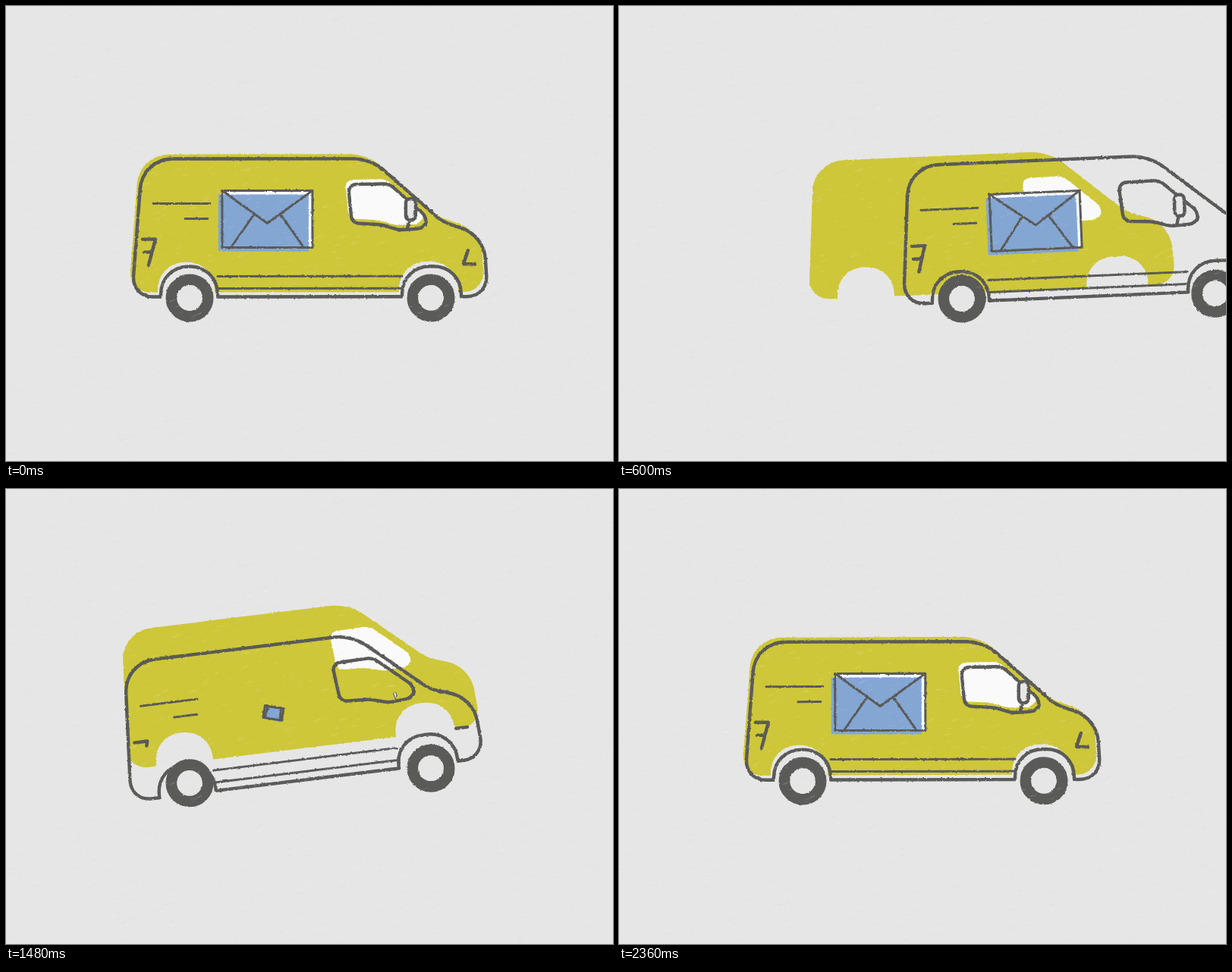
Animation of 800 by 600 pixels, one loop 2400 ms. Source, as an HTML page with a canvas:

```html
<!DOCTYPE html>
<html lang="en">
<head>
<meta charset="utf-8">
<title>Mail van</title>
<style>
  html, body { margin: 0; width: 100%; height: 100%; overflow: hidden; background: #e6e6e6; }
  svg, canvas { position: absolute; left: 0; top: 0; width: 800px; height: 600px; }
  .ink { fill: none; stroke: #5a5a58; stroke-width: 4.4; stroke-linejoin: round; stroke-linecap: round; }
  .thin { stroke-width: 3; }
  .paper { fill: #e6e6e6; }
  .white { fill: #fafafa; }
  #env * { vector-effect: non-scaling-stroke; }
</style>
</head>
<body>
<svg viewBox="0 0 800 600">
  <defs>
    <filter id="rough" filterUnits="userSpaceOnUse" x="0" y="0" width="800" height="600" color-interpolation-filters="sRGB">
      <feTurbulence type="fractalNoise" baseFrequency=".28" numOctaves="2" seed="4"/>
      <feDisplacementMap in="SourceGraphic" scale="2.6" xChannelSelector="R" yChannelSelector="G"/>
    </filter>
    <path id="glass"/>
  </defs>
  <g filter="url(#rough)">
    <g id="paint">
      <path id="bodyFill" fill="#cec739"/>
      <use id="glassFill" href="#glass" class="white"/>
    </g>
    <g id="line">
      <path id="bodyLine" class="ink"/>
      <path id="stripes" class="ink thin"/>
      <use id="glassLine" href="#glass" class="ink"/>
      <path id="speed" class="ink thin"/>
      <g id="rear">
        <path id="handle" class="ink" pathLength="1" d="M180 307H197L188 341"/>
        <path id="bar" class="ink" pathLength="1" d="M192 324H182"/>
      </g>
      <path id="lamp" class="ink" pathLength="1" d="M618 340H603L609 322"/>
      <g id="env">
        <rect class="white" x="-59.5" y="-37.5" width="119" height="75"/>
        <rect id="blue" fill="#84a6d3" x="-59.5" y="-37.5" width="119" height="75"/>
        <rect class="ink thin" x="-59.5" y="-37.5" width="119" height="75"/>
        <path id="flap" class="ink thin"/>
      </g>
      <g id="mirror">
        <path class="ink" d="M3 -11L0 0"/>
        <rect class="ink" style="fill:#e6e6e6" x="-2" y="-39" width="13" height="28" rx="5.5"/>
      </g>
    </g>
    <g id="wheels">
      <circle class="ink" style="fill:#e6e6e6"/>
      <circle class="ink" style="fill:#e6e6e6"/>
    </g>
  </g>
</svg>
<canvas width="800" height="600"></canvas>
<script>
const LOOP = 2400, STEP = 40, LAG = 40;
const LAUNCH = 400, GONE = 720, BORN = 800, APEX = 1240, LAND = 1480;
const { min, max, sin, cos, exp, PI, hypot } = Math;

const el = id => document.getElementById(id);
const lerp = (a, b, t) => a + (b - a) * t;
const ramp = (t, from, to) => min(1, max(0, (t - from) / (to - from)));
const smooth = (t, from, to) => { const u = ramp(t, from, to); return u * u * (3 - 2 * u); };
const out = (u, power) => 1 - (1 - u) ** power;
const pop = (t, from, to) => {
  const u = ramp(t, from, to) - 1;
  return u === -1 ? 0 : 1 + 2.7 * u ** 3 + 1.7 * u * u;
};

const set = (node, attrs) => { for (const k in attrs) node.setAttribute(k, attrs[k]); };
const show = (node, on) => { node.style.display = on ? '' : 'none'; };

// Closed path through [x, y, corner length] points.
function rounded(pts) {
  const n = pts.length;
  const toward = (p, q, r) => {
    const len = hypot(q[0] - p[0], q[1] - p[1]) || 1, k = min(1, r / len);
    return [lerp(p[0], q[0], k), lerp(p[1], q[1], k)];
  };
  return pts.map((p, i) => {
    const a = toward(p, pts[(i + n - 1) % n], p[2]), b = toward(p, pts[(i + 1) % n], p[2]);
    const bend = q => [lerp(q[0], p[0], .58), lerp(q[1], p[1], .58)];
    return `${i ? 'L' : 'M'}${a}C${bend(a)} ${bend(b)} ${b}`;
  }).join('') + 'Z';
}

// Leaving: lean back, then shoot off with cubic speed.
function leaving(t) {
  const pull = smooth(t, 60, 370), go = max(0, t - LAUNCH);
  return {
    dx: -38 * pull + 3.1e-5 * go ** 3,
    squash: max(-.12, .1 * pull - .0009 * go),
    rot: 1.6 * pull - 4 * ramp(t, 440, 540),
    wheelie: 1 + .17 * (smooth(t, 180, 400) - ramp(t, 440, 540))
  };
}

// Arriving: grow while leaping, fall, then swing to rest.
function arriving(t) {
  const after = max(0, t - LAND);
  const leap = t < APEX ? out(ramp(t, BORN, APEX), 2) : 1 - ramp(t, APEX + 20, LAND) ** 2.5;
  return {
    grow: out(ramp(t, BORN, 1120), 1.3),
    arch: -.5 + 1.5 * ramp(t, 1080, 1200),
    lift: -90 * leap + 20 * sin(PI * after / 400) * exp(-after / 250),
    rot: -7 * smooth(t, 1020, 1220) * cos(PI * after / 390) * exp(-((after / 450) ** 2)),
    swing: -32 * sin(PI * (t - 1540) / 350) * (1 - smooth(t, 1720, 1960)) * ramp(t, 1400, LAND)
  };
}

function pose(t) {
  const here = t < GONE;
  const a = leaving(here ? t : 0), b = arriving(here ? LOOP : t);
  const rot = a.rot + b.rot;
  const shift = (x, give = 1) => x + a.dx - give * a.squash * max(0, x - 279);
  // A newborn body is a thin drop, pinched at the sill.
  const place = (x, y) => {
    const pinch = 1 - .9 * ramp(y, 356, 383), up = 383 - y;
    const sx = 402 + (x - 400) * .1 * pinch + up * .05;
    const sy = 371 - up * .515 + max(0, x - 400) * up * .0007;
    return [shift(lerp(sx, x, b.grow)), lerp(sy, y, b.grow)];
  };
  return { ...a, ...b, rot, shift, place,
    clock: here ? LOOP : t,
    transform: `translate(0 ${b.lift}) rotate(${rot} ${400 + a.dx} 408)` };
}

// The wheel cut-outs start as bitten corners and slide inwards to become arches.
function sills(arch) {
  const cut = 1 + min(0, arch), slide = max(0, arch);
  return { cut, slide, rear: 157 + 47 * cut + 75 * slide, front: 648 - 44 * cut - 82 * slide };
}

function body(p) {
  const { cut, slide, rear, front } = sills(p.arch);
  const foot = 383 - 41 * (cut - slide), top = 383 - 40 * cut;
  const back = 157 + 9 * slide, nose = 648 - 13 * slide;
  const rearIn = 157 + 47 * slide, frontIn = 648 - 48 * slide;
  const soft = lerp(.2, 1, p.grow);
  return rounded([
    [rearIn, foot, 0], [back, foot, 28 * slide], [back + 14, 201, 40],
    [487 - 6 * slide, 201, 23], [592 - 17 * slide, 284, 10], [645 - 15 * slide, 303, 30],
    [nose, foot, 28 * slide], [frontIn, foot, 0],
    [frontIn, top, 37 * slide], [front, top, 37 * cut], [front, 383, 0],
    [rear, 383, 0], [rear, top, 37 * cut], [rearIn, top, 37 * slide]
  ].map(([x, y, r]) => [...p.place(x, y), r * soft]));
}

const scaleGlass = p =>
  `translate(${p.dx - p.squash * 55} 0) translate(500 262) scale(${pop(p.clock, 900, 1060)}) translate(-500 -262)`;

function drawOn(node, amount) {
  show(node, amount > .01);
  node.setAttribute('stroke-dasharray', amount > .99 ? 'none' : amount + ' 2');
}

function drawPaint(p) {
  set(el('paint'), { transform: 'translate(-4 -6) ' + p.transform });
  set(el('bodyFill'), { d: body(p) });
  set(el('glassFill'), { transform: scaleGlass(p) });
}

function drawEnvelope(p) {
  const t = p.clock, size = ramp(t, 1404, 1767), fold = smooth(t, 1640, 1880);
  const x = 344.5 + p.dx + 22 * (1 - ramp(t, LAND, 1740));
  const y = 280.5 + lerp(10, 17, ramp(t, LAND, 1720)) * (1 - smooth(t, 1700, 1880));
  show(el('env'), size > 0);
  set(el('env'), { transform: `translate(${x} ${y}) rotate(${p.swing}) scale(${size})` });
  set(el('blue'), { transform: `translate(-5 5) rotate(${p.swing * .35})` });
  const tip = 43 * fold - 37.5, seam = 42 - 25 * fold, meet = lerp(tip, -37.5, seam / 59.5);
  set(el('flap'), { d: `M-59.5-37.5L0 ${tip}L59.5-37.5M${-seam} ${meet}L-48 37.5M${seam} ${meet}L48 37.5` });
}

function drawWheels(p) {
  const grow = pop(p.clock, 1220, 1460), air = min(0, p.lift), tilt = min(0, p.rot);
  const [back, front] = el('wheels').children;
  const wheel = (node, x, y, scale) => {
    show(node, scale > .01);
    set(node, { cx: p.shift(x, .7), cy: y + air, r: 24.2 * scale });
    node.style.strokeWidth = 14.6 * scale;
  };
  wheel(back, 242, 385 - 31.5 * (p.wheelie - 1) - .4 * tilt, grow * p.wheelie);
  wheel(front, 560, 385 + 2.4 * tilt, grow);
}

function drawLine(p) {
  const t = p.clock, slide = `translate(${p.dx} 0)`;
  set(el('line'), { transform: p.transform });
  set(el('bodyLine'), { d: body(p) });
  const { rear, front } = sills(p.arch);
  set(el('stripes'), { d: [356, 372].map(y => `M${p.place(rear, y)}L${p.place(front, y)}`).join('') });

  show(el('glassLine'), t > 900);
  set(el('glassLine'), { transform: scaleGlass(p) });
  const s = smooth(t, 940, 1100);
  show(el('speed'), s > 0);
  set(el('speed'), { transform: slide, d: `M194 260h${75 * s}M236 280h${30 * s}` });

  set(el('rear'), { transform: slide });
  set(el('lamp'), { transform: `translate(${p.shift(609) - 609} 0)` });
  drawOn(el('handle'), ramp(t, 1440, 1530));
  drawOn(el('lamp'), ramp(t, 1440, 1530));
  drawOn(el('bar'), ramp(t, 1680, 1750));

  const m = pop(t, 1470, 1640);
  show(el('mirror'), m > 0);
  set(el('mirror'), { transform: `translate(${529 + p.dx - p.squash * 15} 293) rotate(${-.7 * p.swing}) scale(${m})` });
  drawEnvelope(p);
  drawWheels(p);
}

// Paper fibres over everything.
function drawGrain() {
  const c = document.querySelector('canvas').getContext('2d');
  let s = 7;
  const rnd = () => (s = s * 16807 % 2147483647) / 2147483647;
  c.lineCap = 'round';
  for (let i = 0; i < 2600; i++) {
    const x = rnd() * 800, y = rnd() * 600, len = 2 + rnd() * 7, tilt = -.1 - rnd() * .5;
    c.strokeStyle = rnd() < .7 ? `rgba(255,255,255,${.04 + rnd() * .12})` : 'rgba(120,120,120,.03)';
    c.lineWidth = .7 + rnd() * .9;
    c.beginPath();
    c.moveTo(x, y);
    c.lineTo(x + len, y + len * tilt);
    c.stroke();
  }
}

function layer(ids, t, draw) {
  const on = t < GONE || t >= BORN;
  ids.forEach(id => show(el(id), on));
  if (on) draw(pose(t));
}

set(el('glass'), { d: rounded([[451, 235, 11], [505, 234, 8], [556, 279, 10], [551, 293, 9],
  [518, 295, 6], [495, 288, 6], [456, 286, 9]]) });

const start = performance.now();
function frame() {
  const t = Math.floor((performance.now() - start) % LOOP / STEP) * STEP;
  // The colour plate trails the line work.
  layer(['paint'], (t - LAG + LOOP) % LOOP, drawPaint);
  layer(['line', 'wheels'], t, drawLine);
  requestAnimationFrame(frame);
}
drawGrain();
frame();
</script>
</body>
</html>
```
